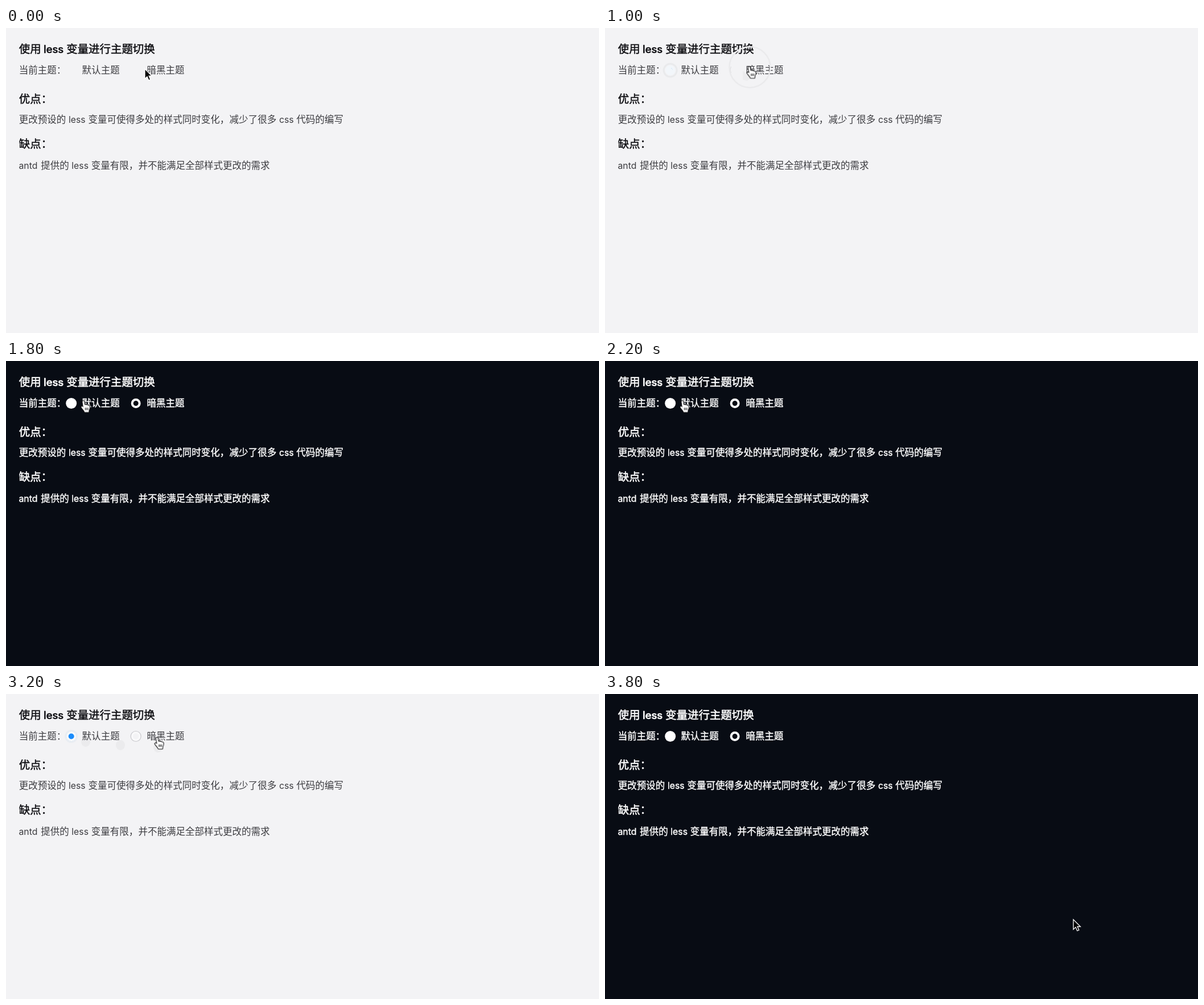
Write an HTML page that moves like this. It is 1042 px wide and 537 px high and loops after 4000 ms.

```html
<!DOCTYPE html>
<html lang="zh-CN">
<head>
<meta charset="utf-8">
<title>less 主题切换</title>
<style>
html, body { margin: 0; width: 100%; height: 100%; overflow: hidden; }
svg { display: block; width: 1042px; height: 537px; background: #f3f3f5; }
svg, svg * { animation-duration: 4s; animation-timing-function: step-end; animation-iteration-count: infinite; }
text { font: 400 16.53px Inter, "Noto Sans CJK SC", "Noto Sans CJK", sans-serif; white-space: pre; }
.latin { font-size: 15.8px; }
.title { font-size: 19.45px; font-weight: 500; }
.title.latin { font-size: 18.4px; }

/* the stroke thickens the strokes of the regular CJK face */
svg { animation-name: stage; }
text { animation-name: body; }
.title { animation-name: title; }
@keyframes stage { 0%, 60% { background: #f3f3f5 } 30%, 85%, 100% { background: #080c14 } }
@keyframes body {
  0%, 60% { fill: #3c3c40; stroke: none }
  30%, 85%, 100% { fill: #fff; stroke: #fff; stroke-width: .4px }
}
@keyframes title {
  0%, 60% { fill: #0c0c10; stroke: #0c0c10; stroke-width: .45px }
  30%, 85%, 100% { fill: #fff; stroke: #fff; stroke-width: .6px }
}

/* radio states */
#halo { animation-name: halo; }
#fresh { animation-name: fresh; }
#dark { animation-name: dark; }
#faint { animation-name: faint; }
#light { animation-name: light; }
@keyframes halo { 0%, 30%, 100% { opacity: 0 } 10% { opacity: 1 } }
@keyframes fresh { 0%, 35%, 90%, 100% { opacity: 0 } 30%, 85% { opacity: 1 } }
@keyframes dark { 0%, 60% { opacity: 0 } 35%, 90%, 100% { opacity: 1 } }
@keyframes faint { 0%, 65%, 100% { opacity: 0 } 60% { opacity: 1 } }
@keyframes light { 0%, 85%, 100% { opacity: 0 } 65% { opacity: 1 } }

/* click rings and pointer trails */
#click1 { animation-name: click1; }
#click2 { animation-name: click2; }
#trail1 { animation-name: light; }
#trail2 { animation-name: trail2; }
#trail3 { animation-name: trail3; }
@keyframes click1 {
  0%, 30%, 100% { opacity: 0; stroke: #d0d0d4 }
  15% { opacity: 1; stroke: #d0d0d4 }
  20% { opacity: 1; stroke: #eaeaec }
}
@keyframes click2 { 0%, 55%, 100% { opacity: 0 } 50% { opacity: 1 } }
@keyframes trail2 { 0%, 85%, 100% { opacity: 0 } 70% { opacity: 1 } }
@keyframes trail3 { 0%, 85%, 100% { opacity: 0 } 75% { opacity: 1 } }

#arrow { animation-name: arrow; }
#hand { animation-name: hand; }
@keyframes arrow {
  0% { opacity: 1; transform: translate(244px, 72px) }
  10% { opacity: 0; transform: translate(244px, 72px) }
  95%, 100% { opacity: 1; transform: translate(823px, 397px) }
}
@keyframes hand {
  0% { opacity: 0; transform: translate(248.5px, 67.5px) }
  10% { opacity: 1; transform: translate(248.5px, 67.5px) }
  40% { opacity: 1; transform: translate(133px, 67.5px) }
  45% { opacity: 1; transform: translate(131px, 69.5px) }
  65% { opacity: 1; transform: translate(191px, 76px) }
  70% { opacity: 1; transform: translate(258px, 83px) }
  75% { opacity: 1; transform: translate(260.5px, 76px) }
  85% { opacity: 1; transform: translate(256px, 66.5px) }
  95%, 100% { opacity: 0; transform: translate(256px, 66.5px) }
}
</style>
</head>
<body>
<svg viewBox="0 0 1042 537">
  <g fill="#ebebed">
    <ellipse id="trail1" cx="140" cy="84" rx="8" ry="9"/>
    <ellipse id="trail2" cx="201" cy="90" rx="8" ry="9"/>
    <ellipse id="trail3" cx="267" cy="94" rx="8" ry="9"/>
  </g>

  <g id="halo" fill="none">
    <path d="M242 75l14 13-6 5-8-2z" fill="#ececee"/>
    <circle cx="114.7" cy="74.5" r="11.5" stroke="#e9eaec" stroke-width="3"/>
    <circle cx="114.7" cy="74.5" r="8.5" fill="#f2f6fa"/>
    <path d="M116 71h2M118 73h1" stroke="#cfe3f7"/>
    <path d="M221.5 68q-3 6 0 11" stroke="#dcdcdf"/>
  </g>
  <g id="fresh">
    <circle cx="114.7" cy="74.5" r="9.6" fill="#f5f9fc"/>
    <circle cx="114.7" cy="74.5" r="5" fill="none" stroke="#6fb0ee" stroke-width="1.2" stroke-dasharray="2 1.5"/>
    <circle cx="228.2" cy="74.5" r="9" fill="#f1f3f3" stroke="#a4a6a8"/>
  </g>
  <g id="dark">
    <circle cx="114.7" cy="74.5" r="9.5" fill="#fff"/>
    <circle cx="228.2" cy="74.5" r="6.5" fill="none" stroke="#fff" stroke-width="4"/>
  </g>
  <g id="faint" fill="none" stroke="#fcfcfd" stroke-width="1.5">
    <circle cx="114.7" cy="74.5" r="6" stroke-dasharray="5 3"/>
    <path d="M111 73l1 1M114 77l1 1" stroke="#d4d6da" stroke-width="1"/>
    <circle cx="228.2" cy="74.5" r="7" stroke-dasharray="12 2"/>
  </g>
  <g id="light">
    <circle cx="114.7" cy="74.5" r="11.5" fill="#e9edf2"/>
    <circle cx="114.7" cy="74.5" r="8.6" fill="#f8fafc" stroke="#dfeaf5" stroke-dasharray="1.5 2"/>
    <circle cx="114.7" cy="74.5" r="5" fill="#1b8cfb"/>
    <circle cx="228.2" cy="74.5" r="9" fill="#f9f9fa" stroke="#c8c8cc" stroke-width="1.2"/>
    <circle cx="228.2" cy="74.5" r="5" fill="#f3f3f5"/>
  </g>

  <g id="copy"></g>

  <g fill="none">
    <circle id="click1" cx="254.5" cy="69" r="36" stroke-width="2.5"/>
    <circle id="click2" cx="136" cy="71" r="36.5" stroke="#74777d" stroke-width="2.5"/>
  </g>

  <path id="arrow" d="M0 0V17.4L4 13.6 6.8 20 9.8 18.7 7.1 12.5H12.4Z" fill="#000" stroke="#fff" stroke-width="1.3"/>
  <g id="hand" stroke="#0a0a0c" stroke-linejoin="round">
    <path fill="#fff" stroke-width="2.2" paint-order="stroke" d="M3.4 2.4C3.2.3 6.1.2 6.4 2L7.2 8C7.7 6.8 9.6 6.9 10 8.3 10.8 7.3 12.6 7.6 12.9 9.1 14 8.4 15.8 9 16 10.6 16.3 13.5 15.6 15 14.7 17L14.3 20.4H7.3C6 17 3 14.8 1.5 12.3.8 10.8 2.6 9.9 3.8 11L5 12.2Z"/>
    <path fill="none" stroke-width="1" d="M8.4 12.8v4.2M10.7 12.8v4.2M13 12.8v4.2"/>
  </g>
</svg>
<script>
// Each line: baseline, style, then [x, words] runs
const lines = [
  [44.3, 'title', [22.8, '使用'], [66, 'less'], [106.2, '变量进行主题切换']],
  [79.7, '', [22.8, '当前主题：'], [133.6, '默认主题'], [247.4, '暗黑主题']],
  [131.6, 'title', [22.8, '优点：']],
  [167, '', [22.8, '更改预设的'], [110, 'less'], [144.5, '变量可使得多处的样式同时变化，'],
    [392.6, '减少了很多'], [480, 'css'], [510.3, '代码的编写']],
  [211, 'title', [22.8, '缺点：']],
  [247.6, '', [22.5, 'antd'], [61.2, '提供的'], [115.3, 'less'], [149.8, '变量有限，并不能满足全部样式更改的需求']]
];
const copy = document.getElementById('copy');
for (const [y, style, ...runs] of lines) {
  for (const [x, words] of runs) {
    const el = document.createElementNS('http://www.w3.org/2000/svg', 'text');
    el.setAttribute('x', x);
    el.setAttribute('y', y);
    el.setAttribute('class', style + (/^[a-z]/.test(words) ? ' latin' : ''));
    el.textContent = words;
    copy.append(el);
  }
}
</script>
</body>
</html>
```
